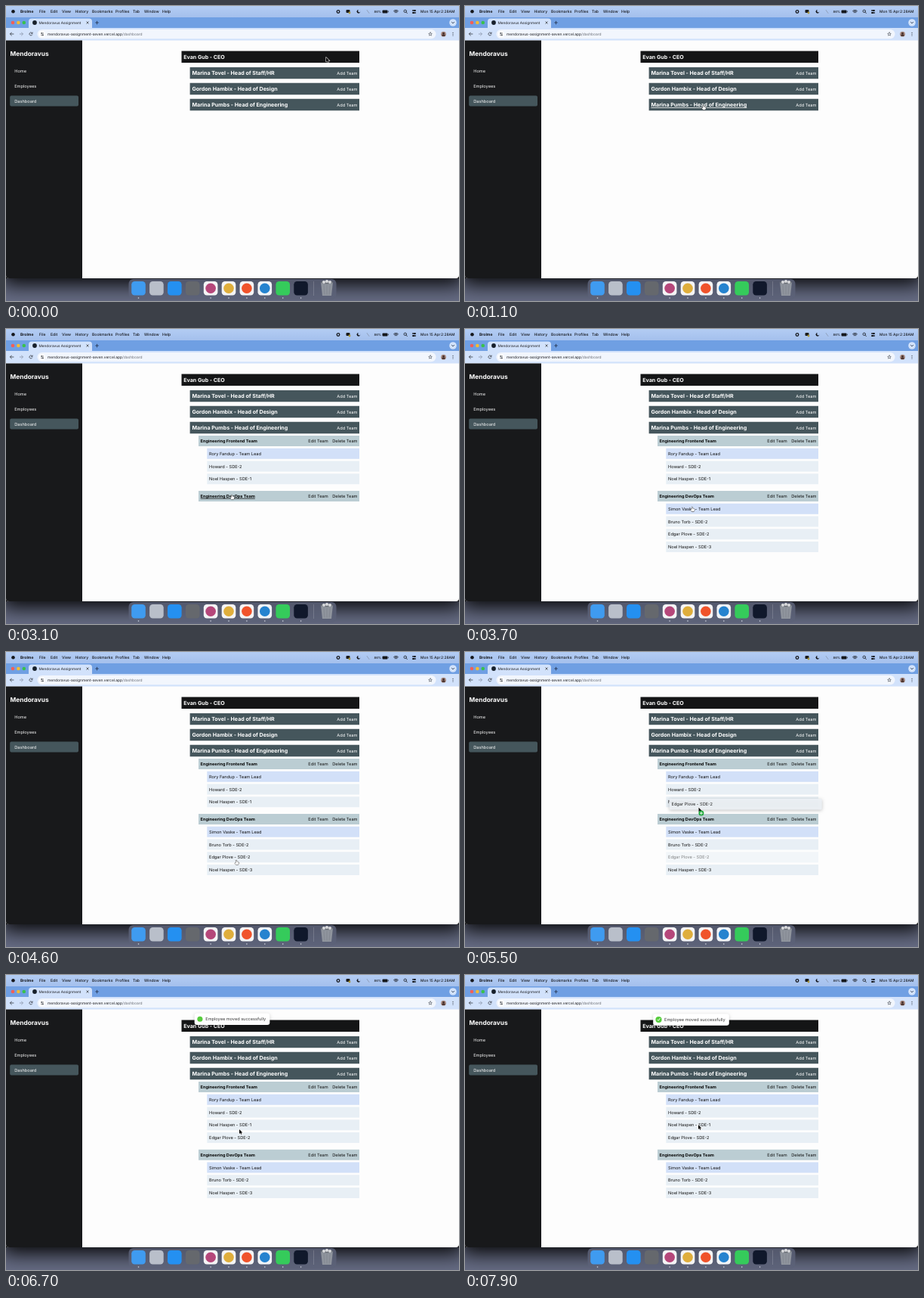
Animation of 600x390 px, one loop 8000 ms. Source, as an HTML page with a canvas:

```html
<!DOCTYPE html>
<html lang="en">
<head>
<meta charset="utf-8">
<title>Team dashboard</title>
<style>
  html, body { margin: 0; width: 100%; height: 100%; overflow: hidden; background: #fdfdfd; }
  canvas { display: block; width: 600px; height: 390px; }
</style>
</head>
<body>
<canvas id="stage"></canvas>
<script>
const W = 600, H = 390, LOOP = 8000;
const canvas = document.getElementById('stage');
const ctx = canvas.getContext('2d');
const ratio = window.devicePixelRatio || 1;
canvas.width = W * ratio;
canvas.height = H * ratio;

const SLATE = '#45565c', INK = '#1c1d20';
const BODY = 5.65, HEADING = 7.1;
const OPEN_TEAMS = 1300, OPEN_FIRST = 2450, OPEN_SECOND = 3300;
const GRAB = 4800, DROP = 5950, MOVED = 6450;

// Pointer stops: time, x, y
const POINTER = [
  [0, 424, 68], [250, 423, 69], [950, 316, 131], [1350, 315, 131],
  [1950, 303.5, 151], [2450, 303.5, 151], [2950, 299, 219], [3400, 299, 219],
  [4250, 305, 275], [4800, 305, 275], [5500, 309.5, 205.5],
  [6300, 309.5, 205], [6700, 309, 204], [7200, 309, 203], [7700, 309, 198], [8000, 309, 198]
];

const clamp = v => Math.max(0, Math.min(1, v));
const mix = (a, b, k) => a + (b - a) * k;
const smooth = k => k * k * (3 - 2 * k);
const easeOut = k => 1 - Math.pow(1 - k, 3);

function box(x, y, w, h, fill, r = 0) {
  ctx.fillStyle = fill;
  ctx.beginPath();
  ctx.roundRect(x, y, w, h, r);
  ctx.fill();
}

function dot(x, y, r, fill) {
  ctx.fillStyle = fill;
  ctx.beginPath();
  ctx.arc(x, y, r, 0, Math.PI * 2);
  ctx.fill();
}

function line(points, color, width = 0.7) {
  ctx.strokeStyle = color;
  ctx.lineWidth = width;
  ctx.lineCap = ctx.lineJoin = 'round';
  ctx.beginPath();
  points.forEach(([x, y]) => ctx.lineTo(x, y));
  ctx.stroke();
}

function arc(x, y, r, from, to, color, width = 0.8) {
  ctx.strokeStyle = color;
  ctx.lineWidth = width;
  ctx.beginPath();
  ctx.arc(x, y, r, from, to);
  ctx.stroke();
}

// y is the vertical middle of the text; returns its width
function text(str, x, y, { size = BODY, weight = 400, color = '#111', align = 'left' } = {}) {
  ctx.font = `${weight} ${size}px Inter, sans-serif`;
  ctx.textRendering = 'geometricPrecision';
  ctx.textAlign = align;
  ctx.textBaseline = 'alphabetic';
  ctx.fillStyle = color;
  ctx.fillText(str, x, y + size * 0.36);
  return ctx.measureText(str).width;
}

function shadow(blur, y, alpha) {
  ctx.shadowColor = `rgba(0,0,0,${alpha})`;
  ctx.shadowBlur = blur * ratio;
  ctx.shadowOffsetY = y * ratio;
}

function menuBar() {
  const sky = ctx.createLinearGradient(0, 0, 0, 15);
  sky.addColorStop(0, '#b3ccf3');
  sky.addColorStop(1, '#a4c0ed');
  box(0, 0, W, 15, sky);
  dot(9.5, 7.3, 2.3, '#16181d');
  const opts = { size: 5.1, weight: 500, color: '#15171c' };
  text('Brolme', 19, 7.3, { ...opts, weight: 700 });
  [['File', 44], ['Edit', 59], ['View', 74], ['History', 91.5], ['Bookmarks', 114],
   ['Profiles', 145], ['Tab', 168], ['Window', 183], ['Help', 207]]
    .forEach(([label, x]) => text(label, x, 7.3, opts));

  arc(440, 7.5, 1.8, 0, 7, '#15171c', 1.3);
  box(450.5, 5, 5, 4, '#1a1a1a', 1);
  dot(455, 9, 1.4, '#a9973a');
  dot(467, 7.3, 2.4, '#15171c');
  dot(468.2, 6.5, 2, '#abc6f0');
  line([[478, 5.5], [481, 9.5]], '#7d8798', 0.6);
  text('86%', 487.5, 7.4, { ...opts, size: 4.2 });
  box(498.5, 5.4, 7, 4, '#15171c', 1);
  box(506, 6.6, 0.6, 1.6, '#15171c');
  [1.3, 2.7, 4.1].forEach(r => arc(516.5, 9.5, r, -2.35, -0.8, '#15171c', 0.9));
  arc(528.7, 6.8, 1.7, 0, 7, '#15171c');
  line([[530, 8.2], [531.4, 9.6]], '#15171c', 0.8);
  box(538, 5, 5, 2, '#15171c', 1);
  box(538, 8, 5, 2, '#15171c', 1);
  dot(539.2, 6, 0.6, '#abc6f0');
  dot(541.8, 9, 0.6, '#abc6f0');
  text('Mon 15 Apr', 549, 7.3, { ...opts, size: 4.9 });
  text('2:28AM', 594.5, 7.3, { ...opts, size: 4.9, align: 'right' });
}

function browserBar() {
  box(0, 15, W, 15, '#6f9fe3');
  ['#f35f57', '#f5bd30', '#39c24b'].forEach((c, i) => dot(9 + i * 7.4, 22, 2.3, c));
  box(30, 16.5, 84, 16, '#d2e2fb', 4);
  dot(38, 22, 2.9, '#17202b');
  text('Mendoravus Assignment', 43.5, 22, { size: 4.75, color: INK });
  line([[106.8, 20.7], [109.2, 23.3]], '#333');
  line([[109.2, 20.7], [106.8, 23.3]], '#333');
  line([[118.5, 22], [122.5, 22]], '#17233a');
  line([[120.5, 20], [120.5, 24]], '#17233a');
  dot(592, 22, 4.8, '#d2e2fb');
  line([[590.4, 21.3], [592, 22.9], [593.6, 21.3]], '#17233a', 0.8);

  box(0, 29, W, 16.5, '#d2e2fb');
  line([[10, 37], [5.5, 37]], '#353a42', 0.8);
  line([[7.4, 35], [5.4, 37], [7.4, 39]], '#353a42', 0.8);
  line([[18, 37], [22.4, 37]], '#8d99ac', 0.8);
  line([[20.5, 35], [22.5, 37], [20.5, 39]], '#8d99ac', 0.8);
  arc(33, 37, 2, 0.5, 5.7, '#353a42', 0.8);
  line([[35, 34.8], [35, 36.4], [33.5, 36.4]], '#353a42');
  box(41.5, 31, 528, 12.2, '#f2f6fd', 6.1);
  dot(48, 37.2, 4.2, '#ffffff');
  line([[46.4, 36], [49.6, 36]], '#353a42');
  line([[46.4, 38.4], [49.6, 38.4]], '#353a42');
  dot(47.2, 36, 0.8, '#353a42');
  dot(48.8, 38.4, 0.8, '#353a42');
  const host = text('mendoravus-assignment-seven.vercel.app', 55, 37.2, { size: 4.9, color: INK });
  text('/dashboard', 55 + host, 37.2, { size: 4.9, color: '#6c7078' });

  const star = [...Array(11).keys()].map(i => {
    const a = i * Math.PI / 5 - Math.PI / 2, r = i % 2 ? 1.1 : 2.4;
    return [562 + r * Math.cos(a), 37.2 + r * Math.sin(a)];
  });
  line(star, '#353a42', 0.55);
  dot(579.5, 37.2, 3.4, '#a98c83');
  dot(579.5, 36.2, 1.5, '#4b3430');
  box(577.4, 37.5, 4.2, 2.4, '#4b3430', 1);
  [-1.8, 0, 1.8].forEach(d => dot(592, 37.2 + d, 0.55, '#353a42'));
}

function sidebar() {
  box(0, 45.5, 101, 314.5, '#18191b', [0, 0, 0, 4]);
  text('Mendoravus', 5.5, 62.6, { size: 8.35, weight: 700, color: '#fff' });
  box(5.2, 118.6, 90.8, 14, SLATE, 2);
  [['Home', 86.2], ['Employees', 105.8], ['Dashboard', 125.6]]
    .forEach(([label, y]) => text(label, 11.2, y, { color: '#f6f6f6' }));
}

// Wallpaper with the shadow the browser window casts on it
function desktop() {
  box(0, 0, W, H, '#666c84');
  ctx.save();
  shadow(26, 8, 1);
  box(-6, 15, W + 12, 345, '#000');
  ctx.restore();
  box(0, 15, W, 345, '#fdfdfd', [0, 0, 4, 4]);
}

function dock() {
  box(162.5, 361, 275, 27, 'rgba(92,98,120,.85)', 6);

  // Tile colour, badge colour, running
  const tiles = [
    ['#3f9bf0', '', 1], ['#b9bfca', '', 0], ['#2490f1', '', 0], ['#65686d', '', 0],
    ['#f4f4f5', '#b5477a', 1], ['#f4f4f5', '#dfae3c', 1], ['#f4f4f5', '#f0532b', 1],
    ['#f1f4f7', '#2583cf', 1], ['#35cb5b', '', 1], ['#10182b', '', 1]
  ];
  tiles.forEach(([tile, badge, running], i) => {
    const x = 175.5 + i * 23.9;
    box(x - 9.3, 364, 18.6, 18.6, tile, 4.3);
    if (badge) dot(x, 373.3, 6.8, badge);
    if (running) dot(x, 386, 0.8, '#d9dde6');
  });
  box(407, 364, 0.5, 19, 'rgba(255,255,255,.35)');

  ctx.fillStyle = '#8f949d';
  ctx.beginPath();
  [[417, 365], [433, 365], [431, 383], [419, 383]].forEach(p => ctx.lineTo(...p));
  ctx.fill();
  ctx.fillStyle = '#6d7279';
  ctx.beginPath();
  ctx.ellipse(425, 365.3, 8, 2.2, 0, 0, 7);
  ctx.fill();
  [[421, 365], [425, 364], [429, 365]].forEach(([x, y]) => dot(x, y, 2, '#d9dadd'));
  [421, 425, 429].forEach(x => line([[x, 369], [mix(x, 425, 0.2), 381]], '#787d86', 0.5));
}

function pointerAt(t) {
  const i = Math.max(1, POINTER.findIndex(p => p[0] >= t));
  const [t0, x0, y0] = POINTER[i - 1], [t1, x1, y1] = POINTER[i];
  const k = smooth(clamp((t - t0) / (t1 - t0)));
  return { x: mix(x0, x1, k), y: mix(y0, y1, k) };
}

const dragging = t => t >= GRAB && t < DROP;

// Draws a clickable title, underlined under the pointer; returns whether it is hovered
function title(str, x, y, half, opts, pointer, t) {
  const width = text(str, x, y, opts);
  const over = t < GRAB && Math.abs(pointer.y - y) < half &&
    pointer.x > x && pointer.x < x + width;
  if (over) box(x, y + opts.size * 0.5, width, 0.6, opts.color);
  return over;
}

function teamsAt(t) {
  const guest = 'Edgar Plove - SDE-2';
  const first = ['Rory Fandup - Team Lead', 'Howard - SDE-2', 'Noel Haspen - SDE-1'];
  const second = ['Simon Vaske - Team Lead', 'Bruno Torb - SDE-2', guest, 'Noel Haspen - SDE-3'];
  if (t >= MOVED) {
    first.push(guest);
    second.splice(2, 1);
  }
  return [
    { name: 'Engineering Frontend Team', members: t >= OPEN_FIRST ? first : [] },
    { name: 'Engineering DevOps Team', members: t >= OPEN_SECOND ? second : [] }
  ];
}

function chart(t, pointer) {
  let hand = false;
  const head = { size: HEADING, weight: 700, color: '#fff' };
  box(232.5, 59.5, 235.5, 15.6, '#141516');
  text('Evan Gub - CEO', 235.2, 67.3, head);

  ['Marina Tovel - Head of Staff/HR', 'Gordon Hambix - Head of Design', 'Marina Pumbs - Head of Engineering']
    .forEach((label, i) => {
      const y = 88.6 + i * 20.95;
      box(243.6, y - 7.7, 224.4, 15.4, SLATE);
      hand = title(label, 246.4, y, 7.7, head, pointer, t) || hand;
      text('Add Team', 465.4, y, { color: '#fff', align: 'right' });
    });

  if (t < OPEN_TEAMS) return hand;
  let y = 148;
  teamsAt(t).forEach(({ name, members }) => {
    box(255, y - 7, 213, 14, '#bbcdd3');
    const bold = { size: 5.6, weight: 700, color: '#080808' };
    hand = title(name, 257.6, y, 7, bold, pointer, t) || hand;
    text('Edit Team', 426.6, y, { align: 'right' });
    text('Delete Team', 465.5, y, { align: 'right' });
    members.forEach((label, i) => {
      y += 16.75;
      const lifted = dragging(t) && label.startsWith('Edgar');
      ctx.globalAlpha = lifted ? 0.5 : 1;
      box(266.3, y - 7, 201.7, 14, i ? '#e8eff5' : '#d2e0f8');
      text(label, 269, y);
      ctx.globalAlpha = 1;
      if (t < GRAB && Math.abs(pointer.y - y) < 7) hand = true;
    });
    y += members.length ? 22.8 : 19.8;
  });
  return hand;
}

function ghost({ x, y }) {
  ctx.save();
  ctx.globalAlpha = 0.93;
  shadow(4, 1, 0.25);
  box(x - 38.8, y - 11.5, 202, 14.5, '#edf2f6', 1.5);
  ctx.restore();
  text('Edgar Plove - SDE-2', x - 36, y - 4.2, { color: '#222' });
}

function toast(t) {
  const age = t - MOVED;
  if (age < 0) return;
  const k = easeOut(clamp(age / 350));
  const scale = mix(0.6, 1, k);
  ctx.save();
  ctx.globalAlpha = mix(0.5, 1, k);
  ctx.translate(299.5, mix(28, 59, k));
  ctx.scale(scale, scale);
  ctx.save();
  shadow(4, 1.2, 0.2);
  box(-50.3, -7.8, 100.6, 15.6, '#fff', 3.3);
  ctx.restore();
  text('Employee moved successfully', -35.5, 0, { color: '#363636' });

  const pop = easeOut(clamp((age - 100) / 300));
  ctx.translate(-43, 0);
  if (pop > 0) dot(0, 0, 4.1 * pop, '#55cb3b');
  const tick = clamp((age - 300) / 200);
  if (tick > 0) {
    const bend = clamp(tick / 0.4), rise = clamp((tick - 0.4) / 0.6);
    const x = mix(-1.6, -0.4, bend), y = mix(0.1, 1.4, bend);
    line([[-1.6, 0.1], [x, y], [x + 2.2 * rise, y - 3 * rise]], '#fff', 0.9);
  }
  ctx.restore();
}

function drawPointer({ x, y }, hand, copying) {
  const arrow = 'M0 0V6L1.4 4.8 2.3 6.8 3.3 6.4 2.4 4.4H4.3Z';
  const finger = 'M-.5 .4Q0-.4 .6 .4V2.3Q2.5 2 3.2 3V4.6L2.5 6.2H-.4L-2 4.1Q-2 3-.5 3.7Z';
  const shape = new Path2D(hand ? finger : arrow);
  ctx.save();
  ctx.translate(x, y);
  ctx.lineJoin = 'round';
  ctx.lineWidth = hand ? 0.8 : 1;
  ctx.strokeStyle = hand ? '#111' : '#fff';
  ctx.fillStyle = hand ? '#fff' : '#080808';
  ctx.stroke(shape);
  ctx.fill(shape);
  if (copying) {
    dot(3.4, 7.6, 3.5, '#20a83c');
    line([[1.7, 7.6], [5.1, 7.6]], '#fff', 0.9);
    line([[3.4, 5.9], [3.4, 9.3]], '#fff', 0.9);
  }
  ctx.restore();
}

function draw(t) {
  ctx.setTransform(ratio, 0, 0, ratio, 0, 0);
  desktop();
  menuBar();
  browserBar();
  dock();
  sidebar();
  const pointer = pointerAt(t);
  const hand = chart(t, pointer);
  if (dragging(t)) ghost(pointer);
  toast(t);
  drawPointer(pointer, hand, dragging(t));
}

const start = performance.now();
function tick() {
  draw((performance.now() - start) % LOOP);
  requestAnimationFrame(tick);
}
tick();
</script>
</body>
</html>
```
